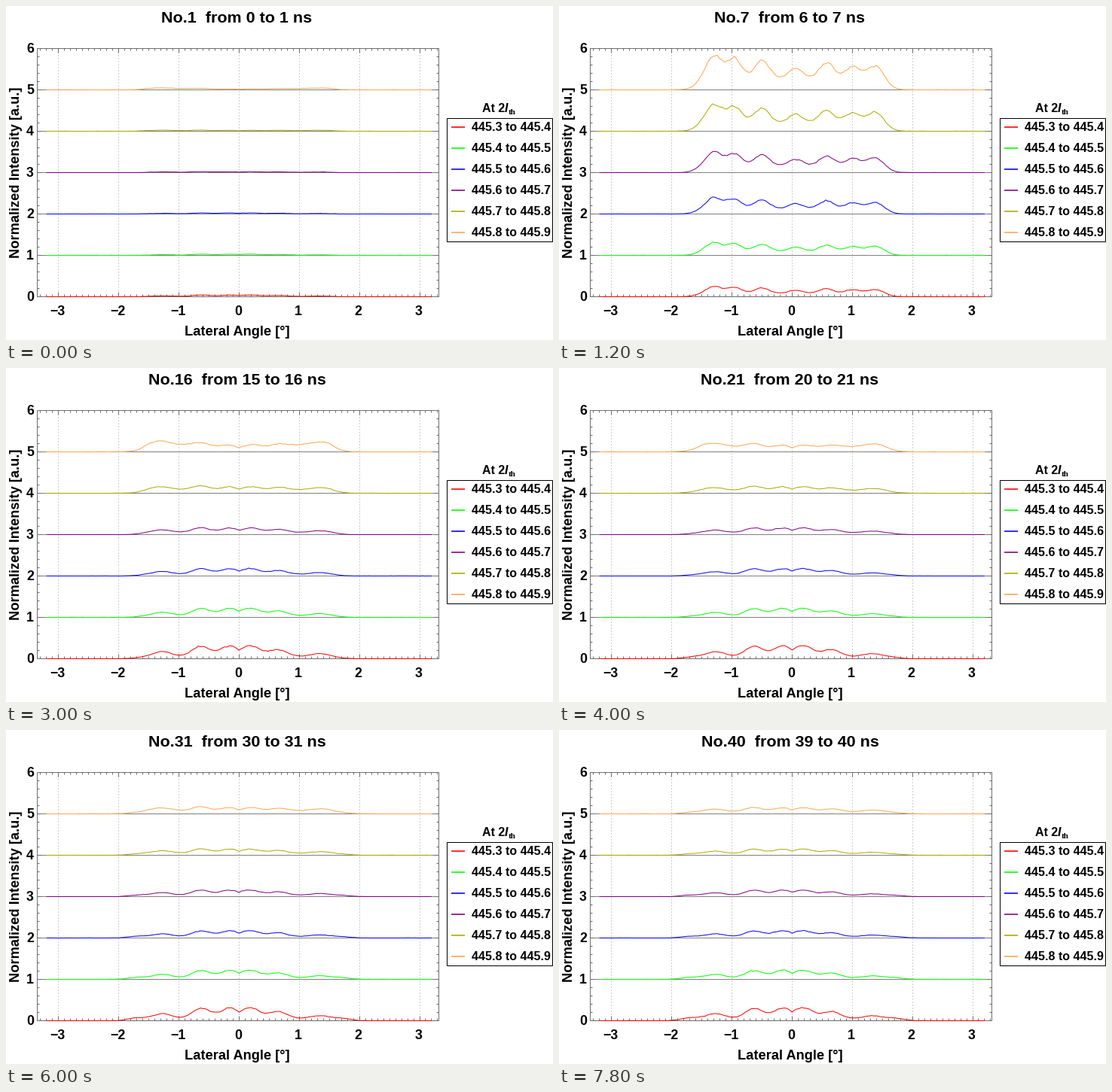
Recreate the animation shown at these times as a matplotlib script. Size 726 by 444 pixels, loop 8000 ms.

```python
import numpy as np
import matplotlib.pyplot as plt
from matplotlib.animation import FuncAnimation
from matplotlib.patches import Rectangle

W, H, DPI = 726, 444, 64
PT = 72 / DPI  # points per pixel
STEPS = 40
COLORS = ["#ff0000", "#00ff00", "#0000ff", "#800080", "#aaaa00", "#ffa550"]
GRAY = "#6e6e6e"
LEFT, RIGHT, TOP, BOTTOM = 41, 574, 56, 386

plt.rcParams["font.family"] = "Liberation Sans"
fig = plt.figure(figsize=(W / DPI, H / DPI), dpi=DPI, facecolor="white")
ax = fig.add_axes([0, 0, 1, 1])
ax.set_xlim(0, W)
ax.set_ylim(H, 0)
ax.axis("off")


def px(v):
    return 308.8 + 79.9 * v


def py(v):
    return BOTTOM - 55 * v


def line(xs, ys, color=GRAY, width=1.0, **kw):
    kw.setdefault("solid_capstyle", "butt")
    return ax.plot(xs, ys, color=color, lw=width * PT, **kw)[0]


def box(x, y, w, h, color):
    ax.add_patch(Rectangle((x, y), w, h, fill=False, ec=color, lw=PT, zorder=2))


def label(x, y, s, size, ha="center", **kw):
    return ax.text(x, y, s, fontsize=size * PT, ha=ha, va="baseline",
                   weight="bold", **kw)


def draw_plot_frame():
    for v in range(-3, 4):
        line([px(v)] * 2, [BOTTOM, TOP], "#9a9a9a", linestyle=(0, (1, 3)), zorder=1)
        label(px(v) - 1, 411, f"{v}".replace("-", "\u2212"), 17.8)
    for v in range(1, 6):
        line([LEFT, RIGHT], [py(v)] * 2, "#808080", zorder=1.5)
    for v in range(7):
        label(37, py(v) + 6.3, str(v), 17.8, ha="right")
    for i in range(-33, 34):
        n = 6 if i % 10 == 0 else 3
        for edge, d in ((BOTTOM, -n), (TOP, n)):
            line([px(i / 10)] * 2, [edge, edge + d], zorder=2)
    for i in range(31):
        n = 6 if i % 5 == 0 else 3
        for edge, d in ((LEFT, n), (RIGHT, -n)):
            line([edge, edge + d], [py(i / 5)] * 2, zorder=2)
    box(LEFT, TOP, RIGHT - LEFT, BOTTOM - TOP, GRAY)
    label(306.5, 438, "Lateral Angle [\u00b0]", 18.2)
    label(18, 221, "Normalized Intensity [a.u.]", 18.2, rotation=90,
          rotation_mode="anchor")


def draw_legend():
    label(631.5, 141, "At 2", 16, ha="left")
    label(662, 141, "I", 16, ha="left", style="italic")
    label(667, 143.5, "th", 11, ha="left", family="Liberation Serif")
    box(585, 149, 140, 164, "black")
    for i, c in enumerate(COLORS):
        y = 160.5 + 28 * i
        line([591, 609], [y, y], c, 1.6)
        label(618, y + 5.5, f"{445.3 + i / 10:.1f} to {445.4 + i / 10:.1f}", 16,
              ha="left")


angle = np.linspace(-3.2, 3.2, 161)
band = np.arange(6)[:, None]


def smooth(t):
    t = min(max(t, 0), 1)
    return t * t * (3 - 2 * t)


def plateau(edge):
    return 1 / (1 + np.abs(angle / edge) ** 24)


def lobes(width, peaks):
    return sum(h * np.exp(-((angle - c) / width) ** 2 / 2) for c, h in peaks)


def flash():
    """Turn-on overshoot, stronger towards long wavelengths."""
    peaks = [(-1.3, .58), (-.96, .5), (-.5, .46), (.06, .27), (.57, .4),
             (1.01, .31), (1.38, .34)]
    return 0.3 ** (1 - band / 5) * (0.25 * plateau(1.6) + lobes(0.125, peaks))


def settled(no):
    """Steady lobes, plus a wide part that fades in the long-wave bands."""
    side = smooth((no - 7) / 28)
    peaks = [(-1.7, .03 * side), (-1.27, .12), (-.63, .25), (-.16, .25),
             (.2, .25), (.65, .17), (1.33, .07), (1.7, .02 * side)]
    notch = 1 - 0.3 * np.exp(-np.abs(angle) / 0.06)
    core = (0.05 * plateau(1.6 + 0.25 * side) + lobes(0.15, peaks)) * notch
    wide = 0.2 * np.exp((11 - no) / 15) * np.abs(angle) * plateau(1.57)
    return (0.45 + 0.55 * np.exp(-band / 1.3)) * core + 0.42 ** (5 - band) * wide


def intensity(no):
    rise, fall = smooth((no - 1) / 6), smooth((no - 7) / 4)
    calm = settled(max(no, 11))
    rows = (0.14 * (1 - rise) + fall) * calm + rise * (1 - fall) * flash()
    grain = np.random.default_rng(no).normal(0, 1, (2, *rows.shape))
    return np.maximum(rows * (1 + 0.025 * grain[0]) + 0.0015 * grain[1], 0)


draw_plot_frame()
draw_legend()
title = label(306.5, 22, "", 21.45)
curves = [line(px(angle) + 0.5, 0 * angle, c, zorder=3) for c in COLORS]


def update(i):
    no = i + 1
    title.set_text(f"No.{no}  from {i} to {no} ns")
    for base, (curve, row) in enumerate(zip(curves, intensity(no))):
        curve.set_ydata(py(base + row) + 0.5)
    return [title, *curves]


anim = FuncAnimation(fig, update, frames=STEPS, interval=200, repeat=True,
                     repeat_delay=0, init_func=lambda: update(0))
plt.show()
```
